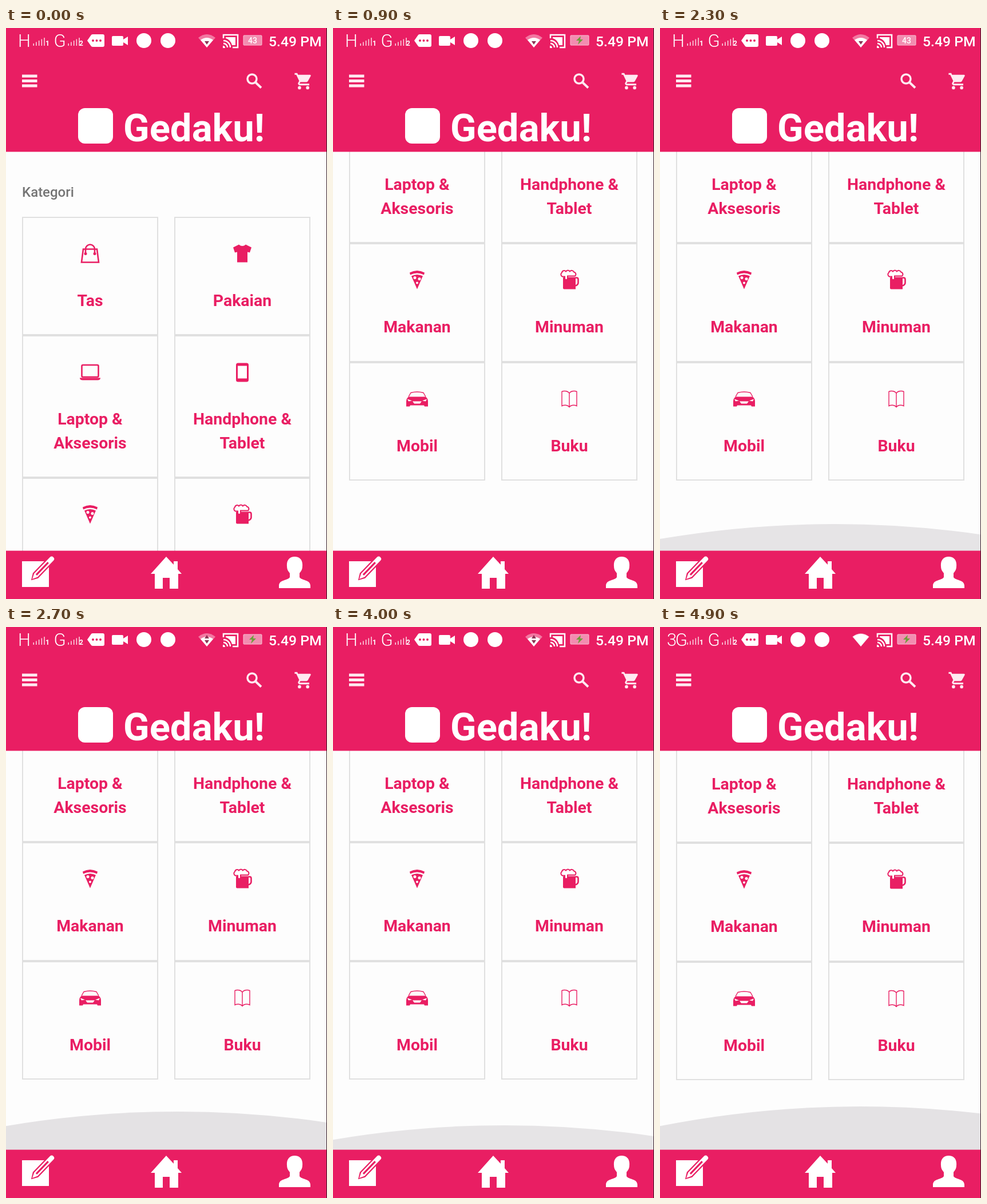
Recreate the animation shown at these times as an HTML page. Size 561 px wide and 998 px high, loop 5100 ms.

```html
<!DOCTYPE html>
<html lang="id">
<head>
<meta charset="utf-8">
<title>Gedaku</title>
<style>
  html, body { margin: 0; width: 100%; height: 100%; overflow: hidden; background: #fdfdfd; }
  svg { display: block; font-family: Roboto, sans-serif; }
  .pink { fill: #e91e63; }
  .white { fill: #fff; }
  .line { fill: none; stroke: #e91e63; stroke-width: 2.6; }
  .thin { stroke-width: 1.4; }
  .label { font-size: 28.4px; font-weight: 700; text-anchor: middle; }
  .card { fill: none; stroke: #e0e0e0; stroke-width: 2; }
  .network { font-size: 31px; font-weight: 300; letter-spacing: -2.5px; }
</style>
</head>
<body>
<svg width="561" height="998" viewBox="0 0 561 998">
  <rect width="561" height="998" fill="#fdfdfd"/>
  <g id="content">
    <text x="28" y="295" font-size="24" font-weight="500" fill="#757575">Kategori</text>
  </g>
  <path id="glow" fill="#746974"/>

  <rect class="pink" width="561" height="216.4"/>
  <g id="status" class="white">
    <text id="network" class="network" y="33"></text>
    <text class="network" x="83.500" y="33">G</text>
    <path d="M142 22L149 12Q150 11 152 11H169Q172 11 172 14V30Q172 33 169 33H152Q150 33 149 32Z"/>
    <g class="pink"><circle cx="152" cy="22" r="2"/><circle cx="158.500" cy="22" r="2"/><circle cx="165" cy="22" r="2"/></g>
    <path d="M187 14H203Q205 14 205 16V20L213 15V30L205 25V29Q205 31 203 31H187Q185 31 185 29V16Q185 14 187 14Z"/>
    <circle cx="241" cy="22" r="13"/>
    <circle cx="283" cy="22" r="13"/>
    <path d="M336 17Q351 5 366 17L351 34Z" opacity=".4"/>
    <path id="wifi"/>
    <path id="arrows" fill="#8d3355"/>
    <path d="M380 18V12H405V34H396M380 22A12 12 0 0 1 392 34M380 27A7 7 0 0 1 387 34"
      fill="none" stroke="#fff" stroke-width="2.500"/>
    <path d="M379 31a4 4 0 0 1 4 4h-4ZM384 16H401V30H395Q392 20 384 18Z"/>
    <rect x="415" y="13" width="32" height="17" rx="1" fill="#f28db0" stroke="#f9c3d5"/>
    <text id="level" x="431" y="26.500" font-size="14" font-weight="500" text-anchor="middle">43</text>
    <path id="bolt" d="M433 14L425 22H430L428 29L437 20H432Z" fill="#6f9f3c"/>
    <text x="459" y="32" font-size="24.700" font-weight="500">5.49 PM</text>
  </g>

  <g fill="#ffeaf1">
    <path d="M28 81.500H54.500V86.500H28ZM28 90H54.500V95H28ZM28 98.500H54.500V103.500H28Z"/>
    <g fill="none" stroke="#ffeaf1" stroke-width="3.500">
      <circle cx="430" cy="89" r="8"/><path d="M435.500 94.500L446 104.500" stroke-width="4"/>
    </g>
    <g transform="translate(503 76) scale(1.420)">
      <path d="M1 2H4.270L5.210 4H20Q21.300 4.200 20.900 5.500L17.300 12Q16.700 13 15.550 13H8.100L7.200 14.700Q7.100 15 7.420 15H19V17H7Q4.500 16.500 5.250 14L6.600 11.600L3 4H1Z"/>
      <circle cx="7" cy="20" r="2"/><circle cx="17" cy="20" r="2"/>
    </g>
  </g>
  <g class="white">
    <rect x="126" y="140" width="61" height="62" rx="12"/>
    <text x="205" y="198" font-size="67" font-weight="700">Gedaku!</text>
  </g>

  <rect class="pink" y="913.6" width="561" height="85"/>
  <g class="white">
    <path d="M28 932H75V977H28Z"/>
    <g transform="translate(46 963) rotate(-46)">
      <path class="pink" d="M-3 0L8-6.500H42V6.500H8Z"/>
      <path d="M0 0L9-4.200H49Q53-4.200 53 0T49 4.200H9Z"/>
      <path class="pink" d="M10-1.600H40V1.600H10Z"/>
    </g>
    <path d="M253 954L280 924L293 938V932H300V946L307 954H301V980H286V961H274V980H260V954Z"/>
    <path d="M504.500 924C514 924 519 931 518 941C518 947 515 950 513 953V960C517 966 532 964 532 975V979H477V975C477 964 492 966 496 960V953C494 950 491 947 491 941C490 931 495 924 504.500 924Z"/>
  </g>
  <path d="M560.500 0V998" stroke="#38202a"/>
</svg>

<script>
const $ = id => document.getElementById(id);

const icons = {
  bag: `<path class="line" d="M-12-8H12L15 15H-15ZM-8 0V-8A8 8 0 0 1 8-8V0"/>
    <circle class="pink" cx="-8" r="2.500"/><circle class="pink" cx="8" r="2.500"/>`,
  shirt: '<path class="pink" d="M-6-16Q0-11 6-16L16-11L13-2L9-3V15H-9V-3L-13-2L-16-11Z"/>',
  laptop: `<rect class="line" x="-14.500" y="-12.500" width="29" height="21" rx="2"/>
    <path class="pink" d="M-18 10H18Q18 14 13 14H-13Q-18 14-18 10Z"/>`,
  phone: `<rect class="pink" x="-11" y="-16" width="22" height="33" rx="3.500"/>
    <path class="white" d="M-8-11H8V11H-8Z"/>`,
  pizza: `<path class="pink" d="M-13-13Q0-20 13-13L12-9Q0-15-12-9ZM-10-7Q0-12 10-7L0 16Z"/>
    <g class="white"><circle cx="-4" cy="-4" r="2.500"/><circle cx="4" cy="-2" r="2.500"/><circle cy="5" r="2"/></g>`,
  beer: `<path class="pink" d="M-11-5H11V16H-9Q-11 16-11 14Z"/>
    <path class="line" d="M11-4H13Q15.500-4 15.500-1V5Q15.500 8 11 10"/>
    <path class="line" style="fill: #fff; stroke-width: 2" d="M-12-6A4 4 0 0 1-13-13A4 4 0 0 1-6-15
      A4 4 0 0 1 1-15A4 4 0 0 1 8-14A4 4 0 0 1 10-7H-3V-3A2.500 2.500 0 0 1-8-3V-6Z"/>`,
  car: `<path class="line thin" d="M-15-4L-11-11Q0-14 11-11L15-4"/>
    <path class="pink" d="M-15-4H15Q19-1 19 4V13H13L12 11H-12L-13 13H-19V4Q-19-1-15-4Z"/>
    <path class="white" d="M-17 0L-9 3L-15 4ZM17 0L9 3L15 4ZM-8 4H8L5 8H-5Z"/>`,
  book: `<path class="line thin"
    d="M0-10C-2-14-9-15-13-13V12C-9 10-3 10 0 14C3 10 9 10 13 12V-13C9-15 2-14 0-10V14"/>`
};

const rows = [
  [331, 205, ['bag', 'Tas'], ['shirt', 'Pakaian']],
  [538, 247, ['laptop', 'Laptop &amp;', 'Aksesoris'], ['phone', 'Handphone &amp;', 'Tablet']],
  [787, 206, ['pizza', 'Makanan'], ['beer', 'Minuman']],
  [995, 205, ['car', 'Mobil'], ['book', 'Buku']]
];
let cards = '';
for (const [top, height, ...cells] of rows) {
  cells.forEach(([icon, ...lines], column) => {
    cards += `<g transform="translate(${147 + column * 266} ${top})">
      <rect class="card" x="-118" width="236" height="${height}"/>
      <g transform="translate(0 63.500)">${icons[icon]}</g>
      ${lines.map((text, i) => `<text class="label pink" y="${155 + i * 42}">${text}</text>`).join('')}</g>`;
  });
}
$('content').innerHTML += cards;

// Signal strength bars for both SIM cards
let signal = '';
[0, 61].forEach((dx, sim) => {
  for (let i = 0; i < 5; i++) {
    const h = 4 + i * 2.5;
    signal += `<rect x="${47.5 + dx + i * 4.7}" y="${31 - h}" width="1.5" height="${h}" opacity=".85"/>`;
  }
  signal += `<text x="${69 + dx - sim * 2}" y="31" font-size="12" font-weight="700">${sim + 1}</text>`;
});
$('status').innerHTML += signal;

const LOOP = 5100, STEP = 100;
const scrollKeys = [[0, 0], [300, 230], [400, 230], [700, 410], [4800, 410], [4900, 409]];
const glowKeys = [[1500, 0], [1800, 30], [2000, 42], [2200, 42], [2700, 67], [3000, 67], [3100, 0],
  [3500, 0], [4000, 43], [4100, 45], [4200, 45], [4800, 76]];
const apexKeys = [[1800, 312], [2700, 300], [4200, 300], [4800, 350]];

function track(keys, t) {
  const next = keys.findIndex(key => key[0] > t);
  if (next < 0) return keys[keys.length - 1][1];
  if (!next) return keys[0][1];
  const [t0, a] = keys[next - 1], [t1, b] = keys[next];
  return a + (b - a) * (t - t0) / (t1 - t0);
}

function drawGlow(t) {
  const height = track(glowKeys, t), apex = track(apexKeys, t), bend = 0.00028;
  const y = x => 914 - height + bend * (x - apex) ** 2;
  // Quadratic control point shared by the end tangents of the parabola
  const controlY = y(0) - 2 * bend * apex * 280;
  $('glow').setAttribute('d', `M0 ${y(0)}Q280 ${controlY} 560 ${y(560)}V960H0Z`);
  $('glow').setAttribute('opacity', height ? Math.min(0.19, 0.06 + 0.0024 * height) : 0);
}

function drawStatus(t) {
  const numeric = t < 600 || (t >= 1600 && t < 2500);
  const late = t >= 4500;
  $('level').setAttribute('opacity', +numeric);
  $('bolt').setAttribute('opacity', +!numeric);
  $('network').textContent = late ? '3G' : 'H';
  $('network').setAttribute('x', late ? 12 : 21);
  $('wifi').setAttribute('d', late ? 'M337 17Q351 7 365 17L351 34Z' : 'M340 21Q351 13 362 21L351 34Z');
  $('arrows').setAttribute('d', late ? '' : t < 2500 ? 'M347 23H355L351 29Z'
    : 'M347 20L351 14L355 20ZM347 23H355L351 29Z');
}

function frame(now) {
  const t = Math.floor(now % LOOP / STEP) * STEP;
  $('content').setAttribute('transform', `translate(0 ${-track(scrollKeys, t)})`);
  drawGlow(t);
  drawStatus(t);
  requestAnimationFrame(frame);
}
frame(0);
</script>
</body>
</html>
```
